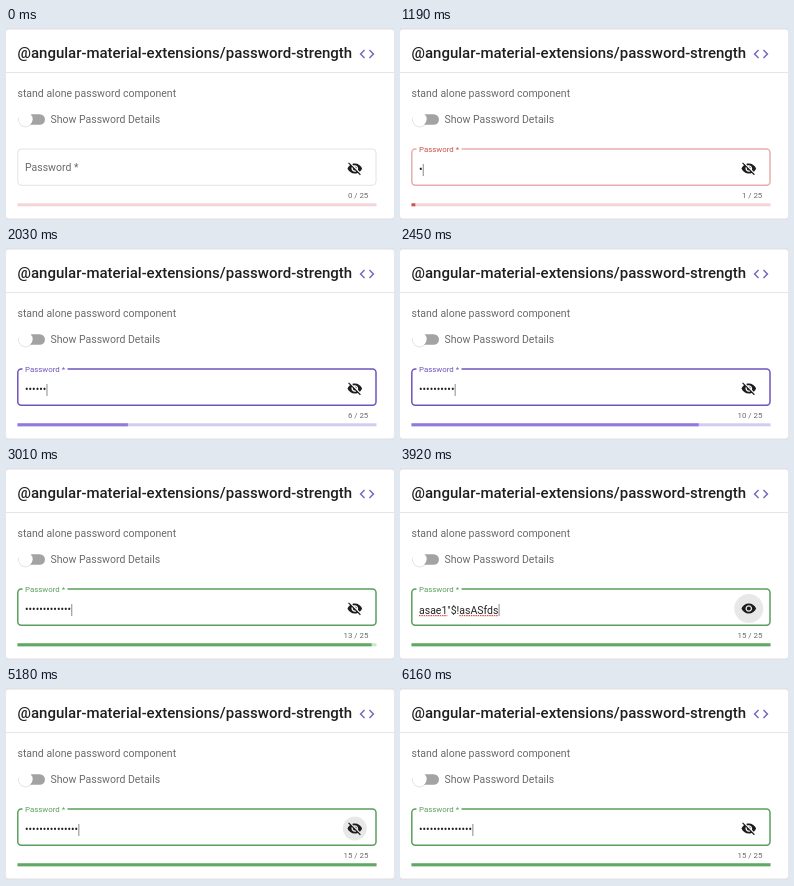
Animation of 388 by 192 pixels, one loop 6510 ms. Source, as an HTML page:

```html
<!DOCTYPE html>
<html lang="en">
<head>
<meta charset="utf-8">
<title>Password strength</title>
<style>
  html, body { margin: 0; width: 100%; height: 100%; overflow: hidden; background: #e2e1e8; }
  svg { display: block; width: 388px; height: 192px; }
  text { font: 10.5px Roboto, Arial, sans-serif; fill: #6a6a6a; white-space: pre; }
  .title { font-size: 15px; font-weight: 500; fill: #1f1f1f; }
  #value { fill: #222; }
  #count { font-size: 7.875px; text-anchor: end; }
  .squiggle { stroke: #d9534a; stroke-width: 1.2; stroke-dasharray: 1.5 .8; }
</style>
</head>
<body>
<svg viewBox="0 0 388 192">
  <rect y="1.5" width="388" height="189" rx="3" fill="#fff"/>
  <text class="title" x="11.5" y="29.6">@angular-material-extensions/password-strength</text>
  <path transform="translate(352 17) scale(.75)" fill="#7a68bd" d="M9.4 16.6L4.8 12l4.6-4.6L8 6l-6 6 6 6 1.4-1.4zm5.2 0l4.6-4.6-4.6-4.6L16 6l6 6-6 6-1.4-1.4z"/>
  <path d="M0 44.5H388" stroke="#e6e6e6"/>
  <text x="11.5" y="69">stand alone password component</text>

  <rect x="12.5" y="86.2" width="26.5" height="10.5" rx="5.25" fill="#a3a3a3"/>
  <circle cx="19.6" cy="92.1" r="7.3" fill="#000" opacity=".11"/>
  <circle cx="19.6" cy="91.3" r="7.1" fill="#fff"/>
  <text x="44.5" y="95">Show Password Details</text>

  <rect id="outline" x="11.8" y="121" width="358.2" height="36.3" rx="3.5" fill="none"/>
  <rect id="gap" x="16.5" y="118" width="45" height="6" fill="#fff"/>
  <text id="label" x="19">Password *</text>
  <text id="value" x="19"></text>
  <g id="spelling">
    <path id="word1" class="squiggle"/>
    <path id="word2" class="squiggle"/>
  </g>
  <rect id="caret" y="136" width="1" height="12" fill="#8a8a8a"/>
  <circle id="ripple" cx="348.8" cy="140.5" fill="#000"/>
  <path id="eye" transform="translate(340.8 132.5) scale(.667)" fill="#1c1c1c"/>
  <text id="count" x="362.3" y="170"></text>

  <rect id="track" x="11.5" y="175.3" width="359" height="3"/>
  <rect id="bar" x="11.5" y="175.3" height="3"/>
</svg>
<script>
const LOOP = 6510, STEP = 70, BLINK = 490;
const FOCUS = 1190, SHOW = 3780, HIDE = 5040;
const PASSWORD = 'asae1"$!asASfds';
const KEYS = [1155, 1400, 1610, 1750, 1890, 1960, 2100, 2170, 2310, 2380, 2800, 2870, 2940, 3080, 3150];
const CARET_RESETS = [...KEYS, 3850, 5180];
const RIPPLES = [SHOW, HIDE + STEP];
const THEMES = {
  warn: { line: '#c9544c', bar: '#c9584f', track: '#f4d4d9' },
  accent: { line: '#6e54bd', bar: '#917adb', track: '#d3caf0' },
  primary: { line: '#5a9f5d', bar: '#62a766', track: '#c8e6c9' }
};
const EYE_OPEN = 'M12 4.5C7 4.5 2.73 7.61 1 12c1.73 4.39 6 7.5 11 7.5s9.27-3.11 11-7.5c-1.73-4.39-6-7.5-11-7.5zM12 17c-2.76 0-5-2.24-5-5s2.24-5 5-5 5 2.24 5 5-2.24 5-5 5zm0-8c-1.66 0-3 1.34-3 3s1.34 3 3 3 3-1.34 3-3-1.34-3-3-3z';
const EYE_OFF = 'M12 7c2.76 0 5 2.24 5 5 0 .65-.13 1.26-.36 1.83l2.92 2.92c1.51-1.26 2.7-2.89 3.43-4.75-1.73-4.39-6-7.5-11-7.5-1.4 0-2.74.25-3.98.7l2.16 2.16C10.74 7.13 11.35 7 12 7zM2 4.27l2.28 2.28.46.46C3.08 8.3 1.78 10.02 1 12c1.73 4.39 6 7.5 11 7.5 1.55 0 3.03-.3 4.38-.84l.42.42L19.73 22 21 20.73 3.27 3 2 4.27zM7.53 9.8l1.55 1.55c-.05.21-.08.43-.08.65 0 1.66 1.34 3 3 3 .22 0 .44-.03.65-.08l1.55 1.55c-.67.33-1.41.53-2.2.53-2.76 0-5-2.24-5-5 0-.79.2-1.53.53-2.2zm4.31-.78l3.15 3.15.02-.16c0-1.66-1.34-3-3-3l-.17.01z';

const $ = id => document.getElementById(id);
const clamp = v => Math.max(0, Math.min(1, v));
const ease = p => p * p * (3 - 2 * p);
const latest = (times, t) => times.filter(time => time <= t).pop();
const set = (id, attrs) => {
  for (const name in attrs) $(id).setAttribute(name, attrs[name]);
};

function strength(n) {
  const s = PASSWORD.slice(0, n);
  const rules = [/[a-z]/, /[A-Z]/, /\d/, /[^a-zA-Z\d]/, /.{8}/];
  return rules.filter(rule => rule.test(s)).length / 5;
}

// Each change of strength starts a 250 ms transition from wherever the bar is.
function barLevel(t) {
  let from = 0, target = 0, start = 0;
  const at = time => from + (target - from) * ease(clamp((time - start) / 250));
  KEYS.forEach((time, i) => {
    const next = strength(i + 1);
    if (time > t || next === target) return;
    [from, target, start] = [at(time), next, time];
  });
  return at(t);
}

function drawField(t, n) {
  const focused = t >= FOCUS, s = strength(n);
  const theme = THEMES[s <= .2 ? 'warn' : s < 1 ? 'accent' : 'primary'];
  set('outline', {
    stroke: focused ? theme.line : '#dfdfdf',
    'stroke-width': focused ? 1.5 : .9,
    'stroke-opacity': focused ? clamp((t - 1050) / 300) : 1
  });
  set('gap', { visibility: focused ? 'visible' : 'hidden' });
  set('label', { y: focused ? 124 : 143 });
  $('label').style.fontSize = focused ? '7.875px' : '10.5px';
  $('label').style.fill = focused ? theme.line : '#6a6a6a';
  $('count').textContent = n + ' / 25';
  set('track', { fill: theme.track });
  set('bar', { fill: theme.bar, width: n ? 359 * barLevel(t) : 0 });
}

function drawInput(t, n) {
  const shown = t >= SHOW && t < HIDE, value = $('value');
  value.textContent = shown ? PASSWORD : '•'.repeat(n);
  set('value', { y: shown ? 145.8 : 145 });
  const edge = i => 19 + (i ? value.getSubStringLength(0, i) : 0);
  set('spelling', { visibility: shown ? 'visible' : 'hidden' });
  if (shown) {
    set('word1', { d: `M19 147.6H${edge(5)}` });
    set('word2', { d: `M${edge(8)} 147.6H${edge(15)}` });
  }
  const lit = n > 0 && Math.floor((t - latest(CARET_RESETS, t)) / BLINK) % 2 === 0;
  set('caret', { x: edge(n) + .2, visibility: lit ? 'visible' : 'hidden' });
  set('eye', { d: shown ? EYE_OPEN : EYE_OFF });
}

function drawRipple(t) {
  const dt = t - (latest(RIPPLES, t) ?? -LOOP);
  set('ripple', {
    r: 14.5 * clamp((dt + STEP) / 170),
    opacity: .09 * clamp((560 - dt) / 350)
  });
}

function draw() {
  const t = Math.floor((performance.now() - begin) % LOOP / STEP) * STEP;
  const n = t < FOCUS ? 0 : KEYS.filter(time => time <= t).length;
  drawField(t, n);
  drawInput(t, n);
  drawRipple(t);
  requestAnimationFrame(draw);
}

const begin = performance.now();
draw();
</script>
</body>
</html>
```
